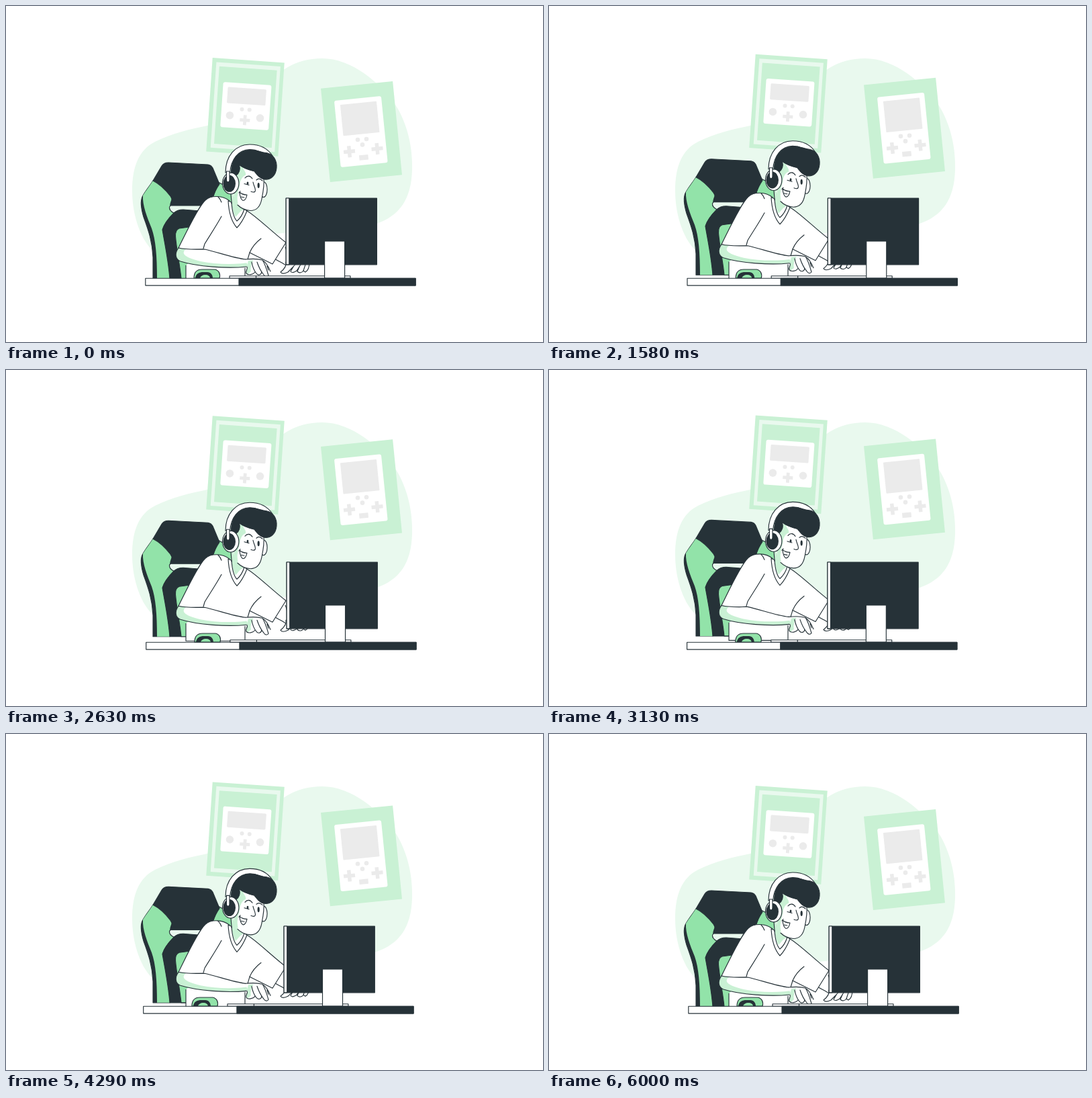
Write an HTML page with a canvas that moves like this. It is 800 by 500 pixels and loops after 6.04 s.

```html
<!DOCTYPE html>
<html lang="en">
<head>
<meta charset="utf-8">
<title>Gamer at a desk</title>
<style>
  html, body { margin: 0; width: 100%; height: 100%; overflow: hidden; background: #fff; }
  canvas { display: block; width: 800px; height: 500px; }
</style>
</head>
<body>
<canvas id="stage"></canvas>
<script>
const LOOP = 6040, CYCLE = 6000;
const INK = '#263238', GREEN = '#92e3a9', LIGHT = '#c9f1d4', PALE = '#e9f9ee';
const GREY = '#ebebeb', WHITE = '#fff';
const LINE = 1.15;

const canvas = document.getElementById('stage');
const ctx = canvas.getContext('2d');
const dpr = window.devicePixelRatio || 1;
canvas.width = 800 * dpr;
canvas.height = 500 * dpr;

const cache = new Map();
function shape(d, fill, stroke, width = LINE) {
  if (!cache.has(d)) cache.set(d, new Path2D(d));
  const path = cache.get(d);
  if (fill) { ctx.fillStyle = fill; ctx.fill(path); }
  if (stroke) { ctx.strokeStyle = stroke; ctx.lineWidth = width; ctx.stroke(path); }
}
const solid = (d, fill) => shape(d, fill, INK);
const line = (d, width) => shape(d, null, INK, width);

function oval(x, y, rx, ry, fill, stroke) {
  ctx.beginPath();
  ctx.ellipse(x, y, rx, ry, 0, 0, Math.PI * 2);
  ctx.fillStyle = fill;
  ctx.fill();
  if (stroke) { ctx.strokeStyle = stroke; ctx.lineWidth = LINE; ctx.stroke(); }
}

function box(x, y, w, h, fill) {
  ctx.fillStyle = fill;
  ctx.fillRect(x, y, w, h);
  ctx.strokeStyle = INK;
  ctx.lineWidth = LINE;
  ctx.strokeRect(x, y, w, h);
}

// Rectangle given by its centre and tilt in degrees
function tilted(cx, cy, w, h, deg, fill, radius = 0) {
  ctx.save();
  ctx.translate(cx, cy);
  ctx.rotate(deg * Math.PI / 180);
  ctx.beginPath();
  ctx.roundRect(-w / 2, -h / 2, w, h, radius);
  ctx.fillStyle = fill;
  ctx.fill();
  ctx.restore();
}

function plus(cx, cy, size, arm, deg) {
  tilted(cx, cy, size, arm, deg, GREY);
  tilted(cx, cy, arm, size, deg, GREY);
}

function blob() {
  shape('M300 178C345 168 366 152 385 125C402 98 430 78 471 78C515 78 558 114 582 150' +
        'C599 178 606 213 605 243C604 288 586 312 552 324C490 340 430 330 370 345' +
        'C320 358 270 380 217 362C204 350 188 317 188 275C188 239 198 214 222 202C248 189 276 183 300 178Z', PALE);
}

function posters() {
  const a = 3.9, b = -5.7;
  tilted(356.5, 150.4, 107.3, 139.6, a, LIGHT);
  tilted(356.8, 150.4, 95.7, 127.5, a, PALE);
  tilted(356.8, 150.4, 86, 115.5, a, LIGHT);
  tilted(357.4, 149, 72, 67, a, WHITE, 3);
  tilted(358.5, 134.3, 57.5, 24, a, GREY, 1.5);
  oval(351.5, 153.7, 3, 3, GREY);
  oval(362.7, 154.6, 3, 3, GREY);
  oval(333.4, 162.7, 5.8, 5.8, GREY);
  oval(378.5, 166.8, 5.8, 5.8, GREY);
  plus(355.8, 169.8, 15, 4.8, a);

  tilted(529.5, 187, 107.6, 139.8, b, LIGHT);
  tilted(528.8, 187, 70.3, 99.5, b, WHITE, 3);
  tilted(527.2, 167.5, 54.3, 46.5, b, GREY, 1);
  oval(524, 199, 3.3, 3.3, GREY);
  oval(537, 198, 3.3, 3.3, GREY);
  oval(531, 206.4, 3.3, 3.3, GREY);
  plus(511.5, 216.7, 17, 5.5, b);
  plus(553, 212.4, 17, 5.5, b);
  tilted(533, 225.4, 13.5, 7.5, b, GREY);
}

function chair() {
  // right wing
  solid('M316 262C325 266 332 272 336 281L338 296L300 296L309 283Z', GREEN);
  // left wing with its dark rim
  solid('M219 260C214 268 207 276 203 284C200 291 202 304 205 314C212 333 218 350 219 374L219 405.500' +
        'L244 405.500L262 303L247 286Z', INK);
  shape('M219 260C214 268 208 275 204 282C203 296 210 314 217 331C223 348 225 372 225 405.500' +
        'L244 405.500C242 380 237 356 233 333C236 323 243 315 250 308C244 304 242 298 247 287C240 274 230 266 219 260Z', GREEN);
  shape('M246 296L292 296L288 306L262 304L250 308C246 306 243 303 243.500 299Z', PALE, INK);
  // head cushion
  solid('M219 260L232 238Q235 233 242 233L301 236Q306 237 308 241L318 265C313 272 310 279 307 287' +
        'L296 297L245 297C248 292 248 287 245 283C238 274 229 265 219 260Z', INK);
  // lumbar cushion
  solid('M233 333C236 323 243 315 250 308Q255 303 264 303L290 305L282 405.500L244 405.500C242 380 237 356 233 333Z', INK);
  solid('M252.500 343Q252 333 258 331L280 328L274 405.500L261 405.500C259 385 254 362 252.500 343Z', GREEN);
}

function farArm() {
  shape('M414 350L426 358L445 380L432 390L400 377Z', WHITE);
  line('M400 376C406 380 412 382 417 386');
  line('M416 359C419 364 419 374 422 381');
  solid('M417 381C418 386 414 392 409 396C411 399 416 398 420 396L428 388L424 395C426 398 430 396 433 394' +
        'L437 388L434 395C437 398 441 397 443 394L446 396C450 394 452 388 452 380Z', WHITE);
  line('M428 388L432 383M437 388L440 383M443 394L446 385');
}

function torso() {
  shape('M333 290C323 282 306 281 297 289C286 299 268 338 257 360L294 363L268 386L268 412L356 412' +
        'L357 388L364 367L397 384L417 352C396 336 372 312 359 305L344 329Z', WHITE);
  line('M333 290C323 282 306 281 297 289C286 299 268 338 257 360C269 363 282 362 294 362');
  line('M316 284C318 286 320 289 321 292');
  line('M321 313C314 326 302 344 296 354L294 361');
  line('M268 386V412H356V390');
  line('M359 305C372 312 396 336 417 352L397 384L363 367');
  line('M380 346C372 352 366 360 363 367L360 377');
}

function nearArm() {
  // forearm
  const arm = 'M257 360C251 368 252 377 260 380C285 388 330 391 358 388';
  const top = 'M257 360C270 363 283 362 296 362C315 366 338 375 357 377';
  shape(arm + 'L384 379L356 377C338 374 315 366 296 362Z', WHITE);
  shape(arm + 'L366 381C345 385 315 385 290 380C269 375 259 369 268 362Z', LIGHT);
  line(arm);
  line(top);
  // hand
  shape('M357 377C366 376 375 376 382 378C386 384 389 394 391 401C389 404 386 403 384 400L378 392L379 398' +
        'C377 401 374 401 372 398L367 393L364 398C360 400 357 398 357 394L360 387Z', WHITE);
  shape('M361 379L369 378C365 383 364 390 365 395L360 399C357 397 358 393 360 390L359 386Z', LIGHT);
  line('M357 377C366 376 375 376 382 378C386 384 389 394 391 401C389 404 386 403 384 400' +
       'C379 394 376 387 374 381');
  line('M381 396C380 401 375 401 373 398C369 393 367 387 366 381');
  line('M371 396C368 400 361 401 358 398C356 394 361 392 359 388');
  line('M383 379C388 382 391 388 394 395M389 387L391 393');
}

function neck() {
  shape('M335 276L336 296C337 310 341 318 344 321L357 305L370 290Z', WHITE);
  shape('M335 274C342 278 347 293 355 302L349 306L342 314C337 306 335 292 335 274Z', LIGHT);
  shape('M331 290L336 292C337 307 340 316 344 320C350 315 353 309 355 302L359 305C355 315 350 324 344 330' +
        'C336 321 332 309 331 290Z', WHITE, INK);
  line('M335 277C335 284 336 288 336 294');
}

function face() {
  oval(383.500, 273, 5.600, 11.5, WHITE, INK);
  const jaw = 'M384 257C385 268 383 277 381 287C379 298 373 304.500 364 304.500C356 304 350 301 345 296';
  shape(jaw + 'L338 280L341 238L382 243Z', WHITE);
  line(jaw);
  shape('M346 238L353 240C354 246 358 246 357 252C352 253 349 259 348 268C346 276 343 283 346 296' +
        'L340 289L338 258Z', LIGHT);

  line('M356 256C359 252 364 252 367 257');
  line('M373 259C376 256 379 257 382 260');
  line('M355 264.500L362 266.500');
  oval(360, 263.8, 1.4, 2.3, INK);
  oval(376.2, 267, 1.6, 4, INK);
  line('M368 262C369 268 373 273 371 276C369 278 367 277 365 276');
  solid('M348 277C351 280 355 281 359 281C358 286 356 289.500 353 289.500C350 288 348.500 283 348 277Z', WHITE);
  line('M350 284L355 285M347 278L349 275.500');
}

function headband() {
  solid('M327 248C327 223 342 206 363 206C378 206 390 212 397 223L390 226C383 218 374 213.500 363 213.500' +
        'C346 214 335 228 333.500 249Z', WHITE);
}

function hair() {
  solid('M336 255C333 232 344 214.500 364 214C374 214 380 218 388 218.500C398 220 404 230 403 241' +
        'C402 253 394 259 385 258C378 257 374 251 370 246C362 244 354 242 347 236C350 243 347 249 343 252Z', INK);
}

function earCup() {
  oval(334.7, 264, 12.2, 15.8, WHITE, INK);
  oval(332.7, 264.3, 9.3, 12.5, INK);
  solid('M328.500 246H333V259Q333 262 330.800 262Q328.500 262 328.500 259Z', WHITE);
}

function desk() {
  // mouse
  solid('M280 405C280 397 284 392 292 392H311C317 393 320 399 318 405Z', GREEN);
  shape('M282 405C283 398 288 396 294 396H300C305 396 308 400 308 405H304C304 402 301 400 297 400' +
        'C293 400 290 402 289 405Z', INK);
  // keyboard
  box(333, 401.7, 180, 3.5, WHITE);
  line('M372.500 401.700V405');
  // monitor
  box(417.2, 286, 135.2, 98.8, INK);
  box(417.2, 286, 4.6, 98.8, WHITE);
  box(474.6, 350, 30, 55, WHITE);
  // table top
  box(207.8, 405.2, 402.3, 10.6, WHITE);
  box(347, 405.2, 263.1, 10.6, INK);
}

const SHAKE = [0, -1, 2, -4, 4, -4, 4, -4, 2, -1, 0];

function shakeAt(p) {
  const s = p * 10, i = Math.min(9, Math.floor(s));
  return SHAKE[i] + (SHAKE[i + 1] - SHAKE[i]) * (s - i);
}

const floatAt = p => -10 * (1 - Math.abs(2 * p - 1));

function moved(x, y, ...parts) {
  ctx.save();
  ctx.translate(x, y);
  parts.forEach(draw => draw());
  ctx.restore();
}

function render(ms) {
  const p = Math.min(ms % LOOP, CYCLE) / CYCLE;
  ctx.setTransform(dpr, 0, 0, dpr, 0, 0);
  ctx.lineJoin = ctx.lineCap = 'round';
  ctx.fillStyle = WHITE;
  ctx.fillRect(0, 0, 800, 500);
  blob();
  moved(0, floatAt(p), posters, chair, farArm, torso, neck, nearArm, face, headband, hair, earCup);
  moved(shakeAt(p), 0, desk);
}

const start = performance.now();
function tick() {
  render(performance.now() - start);
  requestAnimationFrame(tick);
}
tick();
</script>
</body>
</html>
```
